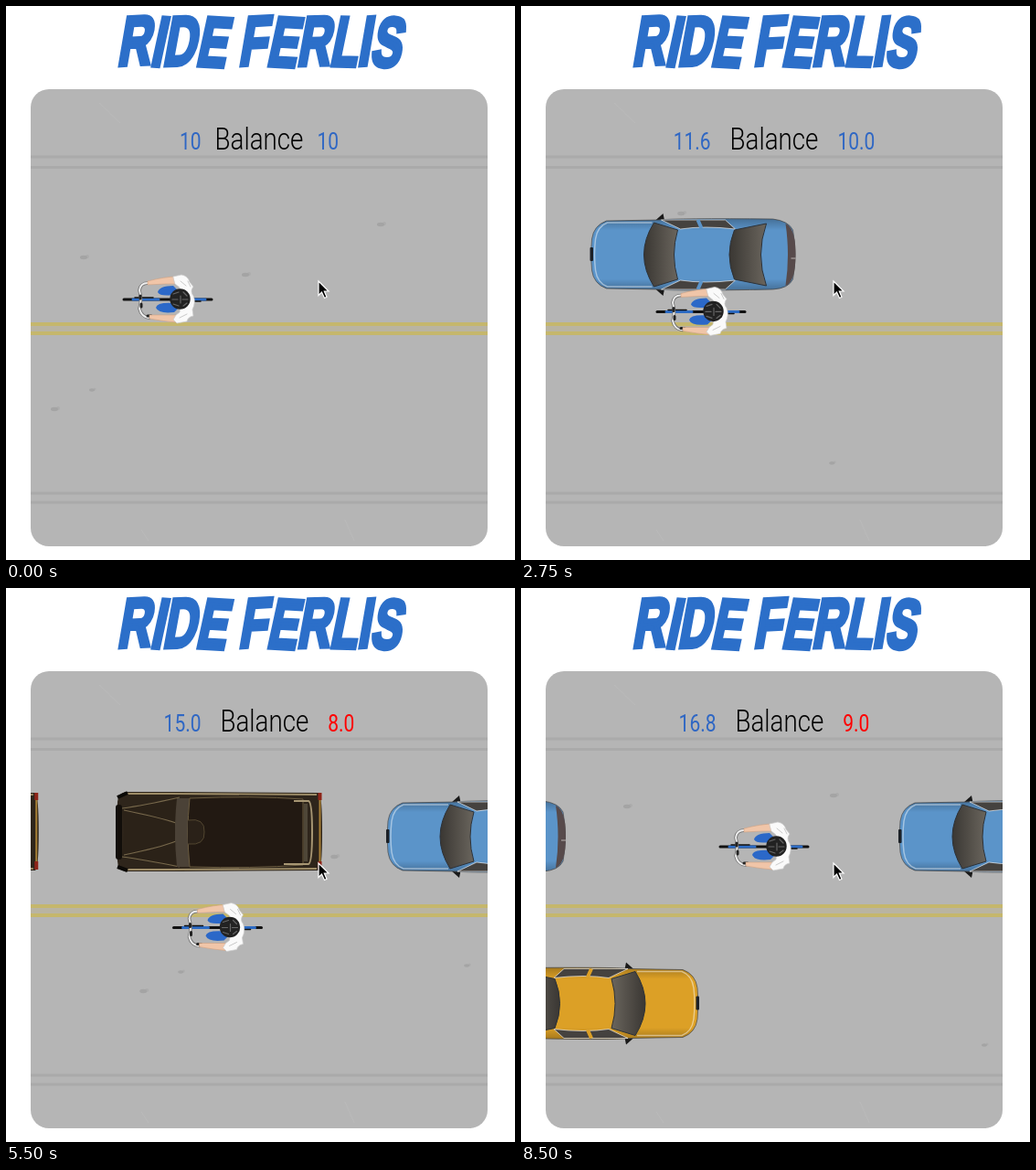
Write an HTML page that moves like this. It is 557 px wide and 606 px high and loops after 8.75 s.

```html
<!DOCTYPE html>
<html lang="en">
<head>
<meta charset="utf-8">
<title>Bike game</title>
<style>
html, body { margin: 0; width: 100%; height: 100%; overflow: hidden; background: #fff }
svg { display: block }
.title { font: 900 76px "Liberation Sans", Arial, sans-serif; fill: #2c6fc9; stroke: #2c6fc9; stroke-width: 5 }
.score { font: 25px Roboto, sans-serif; fill: #2f67c4; text-anchor: middle; white-space: pre }
.score .label { font-size: 33px; font-weight: 300; fill: #000 }
</style>
</head>
<body>
<svg width="557" height="606" viewBox="0 0 557 606">
  <defs>
    <clipPath id="panel"><rect x="27" y="91" width="500" height="500" rx="20"/></clipPath>
    <linearGradient id="shade" x2="0" y2="1">
      <stop offset="0" stop-opacity=".25"/><stop offset=".16" stop-opacity="0"/>
      <stop offset=".84" stop-opacity="0"/><stop offset="1" stop-opacity=".25"/>
    </linearGradient>
    <linearGradient id="glass">
      <stop offset="0" stop-color="#3a3733"/><stop offset="1" stop-color="#6a655d"/>
    </linearGradient>
    <path id="shell" d="M2 -17Q4 -32 18 -37L75 -38Q95 -40 200 -39Q217 -37 222 -27Q227 0 222 27Q217 37 200 38Q95 40 75 38L18 37Q4 32 2 17Q0 0 2 -17Z"/>

    <!-- Sedan: nose at x 0, facing left, painted in currentColor -->
    <g id="sedan">
      <path d="M71 -37L80 -45L82 -35M71 37L80 45L82 35" fill="#191919"/>
      <use href="#shell" fill="currentColor" stroke="#555" stroke-width=".8"/>
      <use href="#shell" fill="url(#shade)"/>
      <rect y="-8" width="3.5" height="15" rx="1" fill="#1c2026"/>
      <path d="M68 -35L19 -35Q8 -31 6 -17Q4 0 6 17Q8 31 19 35L68 35" fill="none" stroke="#fff" stroke-opacity=".45" stroke-width="1.5"/>
      <path d="M78 -38L148 -38L159 -28Q125 -32 99 -28ZM78 38L148 38L159 28Q125 32 99 28Z" fill="#45423f" stroke="#fff" stroke-opacity=".6"/>
      <path d="M118 -38L122 -29M118 38L122 29" stroke="currentColor" stroke-width="4"/>
      <path d="M70 -35L96 -27Q88 0 96 27L70 35Q48 0 70 -35Z" fill="url(#glass)" stroke="#2c3137"/>
      <path d="M158 -27L193 -34Q181 0 193 34L158 27Q147 0 158 -27Z" fill="url(#glass)" stroke="#2c3137"/>
      <path d="M214 -34Q225 -30 225 0Q225 30 214 34Q219 0 214 -34Z" fill="#574a4b"/>
      <path d="M220 4H225" stroke="#b9b3b0"/>
    </g>

    <!-- Black cab: nose at x 0, facing left -->
    <g id="cab">
      <path d="M2 -28Q1 -43 12 -44L70 -44L222 -43Q226 -42 226 0Q226 42 222 42L70 43L12 43Q1 42 2 29Z" fill="#2e251b"/>
      <path d="M10 -42H60L220 -41M10 41H60L220 40" fill="none" stroke="#9c8b66" stroke-width="1.8"/>
      <rect y="-30" width="7" height="60" rx="3" fill="#120e0a"/>
      <path d="M2 -38L13 -43M2 38L13 42" stroke="#0b0906" stroke-width="4"/>
      <path d="M7 -26Q30 -29 70 -38Q62 0 70 38Q30 30 7 27Q11 0 7 -26Z" fill="#2b2218"/>
      <path d="M7 -26Q30 -29 70 -38M7 27Q30 30 70 38M9 -24Q48 -16 66 -10V10Q48 17 9 25" fill="none" stroke="#77684b" stroke-width="1.2"/>
      <path d="M67 -37H81Q77 0 81 38H67Q63 0 67 -37Z" fill="#4b4237"/>
      <path d="M81 -37Q150 -40 205 -36V36Q150 40 81 38Q77 0 81 -37Z" fill="#221912" stroke="#6b5c40"/>
      <path d="M79 -13Q98 -16 97 0Q98 15 79 13" fill="#2a2118" stroke="#524630"/>
      <path d="M195 -34H211Q215 -33 215 0Q215 34 211 35H184" fill="none" stroke="#a79673" stroke-width="2"/>
      <path d="M208 -31V32" stroke="#4f4738" stroke-width="4"/>
      <path d="M223.500 -40V40" stroke="#a77f35" stroke-width="2"/>
      <path d="M223.500 -43V-35M223.500 32V41" stroke="#8e2418" stroke-width="4"/>
    </g>

    <g id="rider" stroke-linecap="round" stroke-linejoin="round">
      <path d="M-48 0H48" stroke="#111" stroke-width="3"/>
      <path d="M-38 0H-10M26 0H41" stroke="#2c6bc4" stroke-width="3"/>
      <path d="M-36 -2H-16M20 2H36" stroke="#111" stroke-width="1.5"/>
      <path d="M-21 -18Q-30 -18 -31 -10Q-28 0 -31 10Q-29 19 -20 20" fill="none" stroke="#777" stroke-width="3.5"/>
      <path d="M-22 -18Q-30 -18 -31 -10Q-28 0 -31 10Q-29 19 -21 20" fill="none" stroke="#eee" stroke-width="1.8"/>
      <path d="M-30 -4V-1M-29 5V8M-22 18H-18" stroke="#222" stroke-width="3"/>
      <path d="M-11 -8Q-9 -15 6 -15L13 -8L7 -5Q-9 -3 -11 -8ZM-13 9Q-12 3 6 4L12 9L7 14Q-10 16 -13 9Z" fill="#2b68c8"/>
      <path d="M10 -25Q-3 -25 -22 -20L-22 -16L-2 -17L12 -17ZM9 25Q-4 24 -20 21L-20 17L-3 17L12 17Z" fill="#f0c5a8" stroke="#cda184" stroke-width=".6"/>
      <path d="M6 -25L15 -27Q22 -26 24 -19L28 -14Q24 -9 28 -4Q31 3 27 11L28 18Q22 19 21 24L10 26L6 22L9 17L13 14L15 0L13 -13L8 -17Z" fill="#fafafa" stroke="#ccc" stroke-width=".7"/>
      <path d="M14 -20L20 -15M13 20L21 16M22 -20L25 -14" stroke="#c9c9c9"/>
      <circle cx="13.500" cy="-.5" r="11.200" fill="#222"/>
      <path d="M6 -6L12 -8M17 -8L21 -4M5 0H11M16 0H22M6 5L12 7M17 7L21 4M14 -4V4" stroke="#666" stroke-width="1.2"/>
    </g>
  </defs>

  <text class="title" transform="translate(121 65) skewX(-11) scale(.655 1)" rotate="-2 2 -1 2 0 -2 2 -1 1 -2 2">RIDE FERLIS</text>

  <g clip-path="url(#panel)">
    <rect x="27" y="91" width="500" height="500" fill="#b5b5b5"/>
    <path d="M102 106L125 128M148 573L156 585M371 562L381 585" stroke="#bababa"/>
    <path d="M27 165H527M27 176.500H527M27 533H527M27 543H527" stroke="#aaa" stroke-width="3"/>
    <path d="M27 353H527" stroke="#b9b4a2" stroke-width="7"/>
    <path d="M27 348H527M27 358H527" stroke="#c5b76c" stroke-width="4"/>
    <g id="marks" fill="#858585"></g>
    <g id="cars"></g>
    <use id="bike" href="#rider"/>
    <text class="score" transform="translate(277 157) scale(.84 1)"><tspan id="left"></tspan><tspan id="label" class="label">Balance</tspan><tspan id="right"></tspan></text>
  </g>
  <path d="M342 301V316.500L345.500 313L348.500 319.500L351 318.300L348.300 312H353Z" stroke="#fff" stroke-width="1.200"/>
</svg>
<script>
const STEP = 250, LOOP = 8750;
const $ = id => document.getElementById(id);

// Piecewise linear value through [time, value] keys, extended past both ends
function track(keys, t) {
  let i = 1;
  while (i < keys.length - 1 && t > keys[i][0]) i++;
  const [t0, v0] = keys[i - 1], [t1, v1] = keys[i];
  return v0 + (v1 - v0) * (t - t0) / (t1 - t0);
}

const times = [0, 2, 3.75, 4.75, 6.25, 7.5, 8.5];
const keyed = values => values.map((v, i) => [times[i], v]);
const bikeX = keyed([177, 197, 197, 217, 246, 266, 266]);
const bikeY = keyed([321, 343, 323, 355, 388, 409, 283]);
const leftScore = keyed([10, 11.4, 11.8, 14, 16, 16.4, 16.8]);
const rightScore = keyed([10, 9.4, 10.6, 8.4, 7.4, 5.8, 9]);
const scroll = [[0, 0], [2, 387], [8.5, 1706]];

// x, y, size, repeat distance
const marks = [
  [53, 441, 4, 1000], [94, 420, 3, 1000], [801, 500, 3, 1000],
  [1407, 413, 3, 2000], [410, 239, 4, 1000], [262, 294, 4, 1000],
  [85, 275, 4, 1000], [636, 227, 4, 1000]
];

const BLUE = '#5b94c9', GOLD = '#dca026';
const cars = [
  { shape: 'sedan', color: BLUE, y: 272, x: [[2, 302], [3, 0]] },
  { shape: 'cab', y: 267, x: [[3.75, 347], [4.75, 40]] },
  { shape: 'cab', y: 267, x: [[4.75, 347], [6.25, -107]] },
  { shape: 'sedan', color: BLUE, y: 272, x: [[6.25, 194], [7.5, -176]] },
  { shape: 'sedan', color: BLUE, y: 272, x: [[6.25, 474], [7.5, 117], [8.5, -176]] },
  { shape: 'sedan', color: BLUE, y: 272, x: [[7.5, 706], [8.5, 413]] },
  { shape: 'sedan', color: GOLD, y: 454.5, x: [[7.5, -97], [8.5, 195]], flip: true }
];

function add(parent, tag, attrs) {
  const el = document.createElementNS('http://www.w3.org/2000/svg', tag);
  for (const name in attrs) el.setAttribute(name, attrs[name]);
  return parent.appendChild(el);
}

const place = (el, x, y, flip) =>
  el.setAttribute('transform', `translate(${x} ${y})${flip ? ' scale(-1 1)' : ''}`);

const carEls = cars.map(c => add($('cars'), 'use', { href: '#' + c.shape, color: c.color || '#000' }));
const markEls = marks.map(([, , r]) => {
  const g = add($('marks'), 'g', { opacity: .35 });
  add(g, 'ellipse', { rx: r, ry: r * .55 });
  add(g, 'circle', { cx: r, cy: -1, r: r / 2, opacity: .5 });
  return g;
});

function draw(t) {
  const shift = track(scroll, t);
  marks.forEach(([x, y, , period], i) => place(markEls[i], (x + shift) % period, y));
  cars.forEach((c, i) => place(carEls[i], track(c.x, t), c.y, c.flip));
  place($('bike'), track(bikeX, t), track(bikeY, t));

  const score = keys => {
    const v = Math.round(track(keys, t) * 5) / 5;
    return t ? v.toFixed(1) : String(v);
  };
  const right = score(rightScore);
  $('left').textContent = score(leftScore);
  $('right').textContent = right;
  $('right').style.fill = right < 10 ? '#f00' : '';
  for (const id of ['label', 'right']) $(id).setAttribute('dx', t ? 25 : 18);
}

const start = performance.now();
let last = -1;
function tick() {
  const step = Math.floor((performance.now() - start) % LOOP / STEP);
  if (step !== last) draw((last = step) * STEP / 1000);
  requestAnimationFrame(tick);
}
tick();
</script>
</body>
</html>
```
